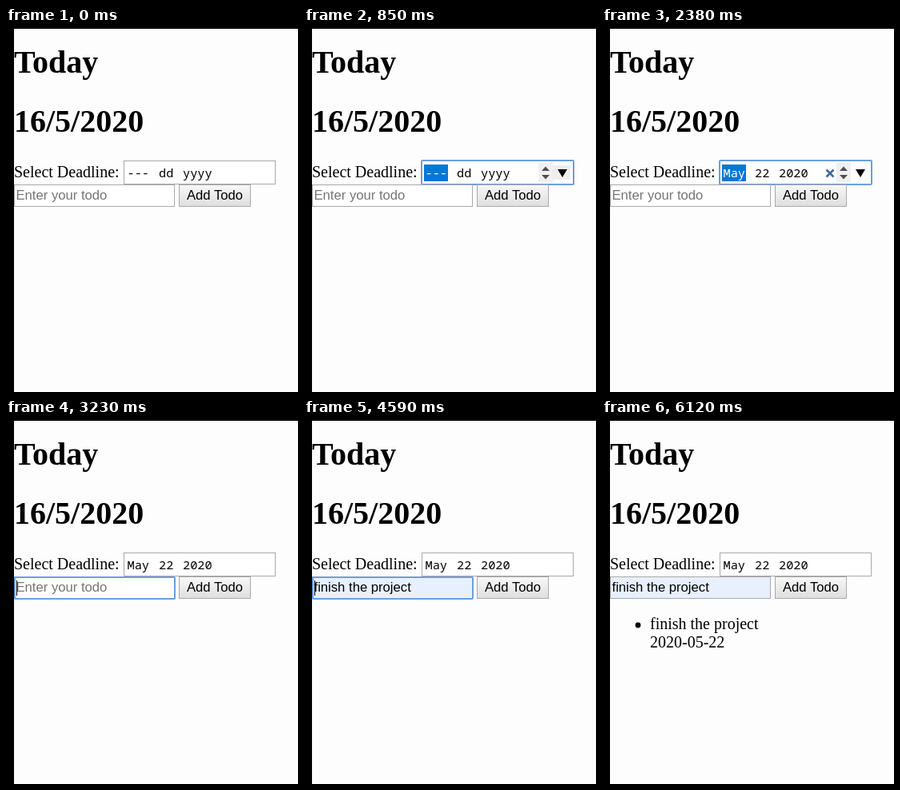
Animation, 365 px wide and 456 px high, one loop 6.97 s. Source, as an HTML page:

```html
<!DOCTYPE html>
<html lang="en">
<head>
<meta charset="utf-8">
<title>Todo form</title>
<style>
  html, body { margin: 0; width: 100%; height: 100%; overflow: hidden; background: #fdfdfd; }
  svg { display: block; }
  text { white-space: pre; }
  .serif { font: 20px "Liberation Serif", serif; }
  .head { font: bold 40px "Liberation Serif", serif; }
  .sans { font: 16.67px "Liberation Sans", sans-serif; }
  .mono { font: 15.3px "Noto Sans Mono", monospace; }
  .cal { font: 15px "Liberation Sans", sans-serif; }
</style>
</head>
<body>
<svg id="stage" width="365" height="456" viewBox="0 0 365 456">
  <defs>
    <linearGradient id="face" x2="0" y2="1">
      <stop stop-color="#f8f8f8"/><stop offset="1" stop-color="#dedede"/>
    </linearGradient>
    <linearGradient id="pressed" x2="0" y2="1">
      <stop stop-color="#dcdcdc"/><stop offset="1" stop-color="#f4f4f4"/>
    </linearGradient>
  </defs>
  <rect width="365" height="456" fill="#fdfdfd"/>
  <path d="M0 0H365V1H10V456H0Z"/>

  <text class="head" x="10" y="56">Today</text>
  <text class="head" x="10" y="130">16/5/2020</text>
  <text class="serif" x="10" y="187">Select Deadline:</text>

  <rect x="147.5" y="166.5" width="189" height="29" fill="#fff" stroke="#a9a9a9"/>
  <rect id="dateRing" x="147" y="166" width="190" height="30" rx="1" fill="none" stroke="#6a9fe0" stroke-width="2"/>
  <rect id="selection" x="150" y="171" width="30" height="21" fill="#0078d7"/>
  <text class="mono" id="month" x="151.5" y="187"></text>
  <text class="mono" id="day" x="191" y="187"></text>
  <text class="mono" id="year" x="221" y="187"></text>
  <path id="clear" d="M280.5 177.5L289.5 186.5M289.5 177.5L280.5 186.5" stroke="#416a9f" stroke-width="2.6"/>
  <g id="controls">
    <rect x="293" y="169" width="18" height="24" fill="#f0f0f0"/>
    <rect id="arrowHover" x="311" y="172" width="22" height="18" fill="#eee"/>
    <path d="M297 179L302 173.5L307 179ZM297 184L302 189.5L307 184Z" fill="#505050"/>
    <path d="M317 177H329L323 187Z"/>
  </g>

  <rect id="todo" x="10.5" y="196.5" width="200" height="27" stroke="#a9a9a9"/>
  <rect id="todoRing" x="11" y="197" width="200" height="27" rx="1" fill="none" stroke="#6a9fe0" stroke-width="2"/>
  <text class="sans" id="todoText" x="12.5" y="215"></text>
  <rect id="caret" x="13" y="201" width="1" height="19"/>

  <rect id="button" x="216.5" y="196.5" width="89" height="27" stroke="#a9a9a9"/>
  <text class="sans" x="226" y="215">Add Todo</text>

  <g id="item">
    <circle cx="45" cy="257" r="3.4"/>
    <text class="serif" x="60" y="262">finish the project</text>
    <text class="serif" x="60" y="285">2020-05-22</text>
  </g>

  <g id="popup">
    <rect x="146.5" y="322.5" width="300" height="300" rx="2" fill="#fff" stroke="#bdbdbd"/>
    <text class="cal" x="166" y="356">May 2020</text>
    <path d="M239 349H248L243.5 354Z"/>
    <rect x="360.5" y="336.5" width="30" height="29" rx="2" fill="url(#face)" stroke="#a5a5a5"/>
    <rect x="160.5" y="378.5" width="300" height="200" fill="#fff" stroke="#6b96d0"/>
    <path d="M161 379H365V409H161Z" fill="#f3f3f3"/>
    <path d="M161 409.5H365" stroke="#d4d4d4"/>
    <g id="cells" class="cal" text-anchor="middle"></g>
  </g>
</svg>
<script>
const LOOP = 6970;
const $ = id => document.getElementById(id);
const show = (id, on) => $(id).setAttribute("visibility", on ? "visible" : "hidden");
const paint = (id, fill) => $(id).setAttribute("fill", fill);
const write = (id, text) => { if ($(id).textContent !== text) $(id).textContent = text; };

function addRow(labels, y, fill) {
  labels.forEach((label, i) => {
    const cell = document.createElementNS("http://www.w3.org/2000/svg", "text");
    cell.setAttribute("x", 182 + i * 42.6);
    cell.setAttribute("y", y);
    cell.setAttribute("fill", fill);
    cell.textContent = label;
    $("cells").append(cell);
  });
}
addRow(["Sat", "Sun", "Mon", "Tue", "Wed"], 400, "#111");
addRow([25, 26, 27, 28, 29], 428, "#b8b8b8");
addRow([2, 3, 4, 5, 6], 453, "#000");

function render(t) {
  const within = (from, to) => t >= from && t < to;
  const dateFocus = within(850, 3230);
  const todoFocus = within(3230, 5950);
  const picked = t >= 2380;
  const filled = t >= 4590;

  show("dateRing", dateFocus);
  show("selection", dateFocus);
  write("month", picked ? "May" : "---");
  write("day", picked ? "22" : "dd");
  write("year", picked ? "2020" : "yyyy");
  paint("month", dateFocus ? "#fff" : "#000");
  show("clear", within(2380, 3230));
  show("controls", within(170, 3230));
  $("arrowHover").setAttribute("opacity", within(680, 1190) ? 1 : 0);

  show("popup", within(1020, 2380));
  $("popup").setAttribute("opacity", t < 1190 ? 0.5 : 1);

  show("todoRing", todoFocus);
  paint("todo", filled ? "#e8f0fe" : "#fff");
  write("todoText", filled ? "finish the project" : "Enter your todo");
  paint("todoText", filled ? "#000" : "#757575");
  show("caret", todoFocus && !within(3740, 4420) && !within(5100, 5610));

  paint("button", within(5950, 6120) ? "url(#pressed)" : "url(#face)");
  show("item", t >= 6120);
}

const start = performance.now();
function tick() {
  render((performance.now() - start) % LOOP);
  requestAnimationFrame(tick);
}
tick();
</script>
</body>
</html>
```
